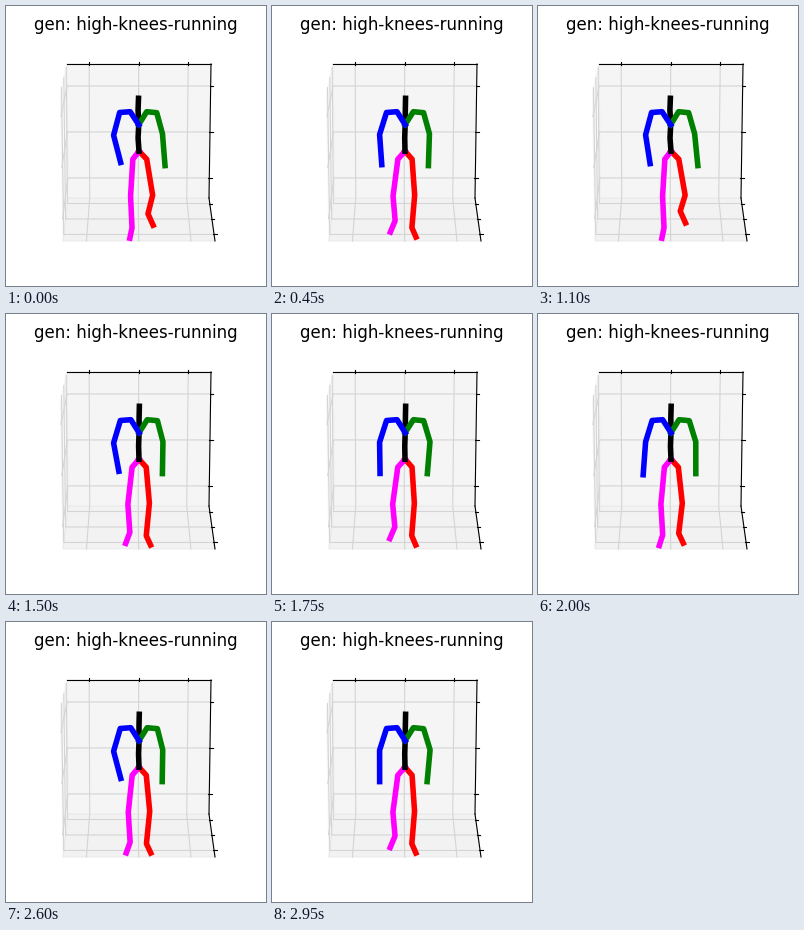
These frames come from a looping animation (260 by 280 pixels, 3000 ms). A matplotlib script:

```python
import numpy as np
import matplotlib.pyplot as plt
from matplotlib.animation import FuncAnimation
from matplotlib.patches import Polygon

W, H, DPI = 260, 280, 100
FRAMES, STEP = 60, 50
STRIDE = 1150  # ms for one full running cycle

fig = plt.figure(figsize=(W / DPI, H / DPI), dpi=DPI, facecolor="white")
ax = fig.add_axes([0, 0, 1, 1])
ax.set_xlim(0, W)
ax.set_ylim(H, 0)
ax.axis("off")
ax.text(129.5, 24.5, "gen: high-knees-running", fontsize=12,
        family="DejaVu Sans", ha="center", va="baseline")

# Corners of the box: back/front, top/bottom, left/right
BTL, BTR, BBL, BBR = map(np.array, ((61, 58), (205, 58), (62, 192), (203, 192)))
FTL, FBL, FBR = map(np.array, ((54.5, 86), (57, 235), (209, 235)))


def mix(a, b, k):
    return a + (b - a) * k


def path(points, color, width, z):
    x, y = zip(*points)
    return ax.plot(x, y, color=color, lw=width, zorder=z)[0]


def pane(points, shade):
    ax.add_patch(Polygon(points, facecolor=str(shade), edgecolor=str(shade),
                         alpha=0.5, lw=1, zorder=0))


def grid(*points):
    path(points, "#d4d4d4", 0.8, 1)


def axis_line(*points):
    path(points, "black", 0.8, 2)


def draw_box():
    pane([BTL, FTL, FBL, BBL], 0.95)
    pane([BBL, BBR, FBR, FBL], 0.90)
    pane([BTL, BTR, BBR, BBL], 0.925)

    for i in range(3):
        k = 0.154 + 0.344 * i
        top = mix(BTL, BTR, k)
        grid(top, mix(BBL, BBR, k), mix(FBL, FBR, k))
        axis_line(top - (0, 2.5), top + (0, 1))

        k = 0.164 + 0.343 * i
        edge = mix(BTR, BBR, k)
        grid(edge, mix(BTL, BBL, k), mix(FTL, FBL, k))
        axis_line(edge - (1, 0), edge + (2.7, 0))

        k = 0.128 + 0.36 * i
        edge = mix(BBR, FBR, k)
        grid(edge, mix(BBL, FBL, k), mix(BTL, FTL, k))
        axis_line(edge - (1, 0), edge + (2.5, 0))

    for a, b in ((BTL, BTR), (BTR, BBR), (BBR, FBR)):
        axis_line(a, b)


def wave(phase, peak, harmonic=1):
    return np.cos(2 * np.pi * harmonic * (phase - peak))


def lift(phase, peak, half):
    """Smooth bump, 1 at the peak and 0 beyond half a width from it."""
    d = abs((phase - peak + 0.5) % 1 - 0.5)
    return np.cos(min(1, d / half) * np.pi / 2) ** 2


def pose(t):
    p = t / STRIDE
    r = 17 * lift(p, -0.07, 0.25)  # right foot height
    m = 9 * lift(p, 0.487, 0.31)   # left foot height
    u = r - m                      # weight shift
    v = min(u, 9)

    root, chest = (133, 145.2), (133 - 0.02 * u, 118.7)
    swing = 6 * wave(p, 0.16) + 2 * wave(p, 0.1, 2)
    flare = 2 * wave(p, 0.92) + 1.2 * wave(p, 0.38, 2)

    return {
        "red": [root, (140.3 + 0.03 * u, 153.2), (144 + 0.19 * u, 189.2),
                (140.6 + 0.1 * u, 221.7 - r), (145 + 0.15 * u, 231 - 0.85 * r)],
        "magenta": [root, (126.3 + 0.06 * v, 153.2), (122.6 + 0.22 * v, 190.2),
                    (124.4 + 0.18 * v, 221.7 - m), (120.8 + 0.34 * v, 232.2 - 0.87 * m)],
        "black": [root, (132.5 - 0.03 * u, 132), chest,
                  (132.9 - 0.06 * u, 104), (133.2 - 0.05 * u, 92.3)],
        "green": [chest, (141.1 - 0.03 * u, 105.7), (151.3 - 0.04 * u, 106.7),
                  (157.2 - 0.9 * wave(p, 0.1), 127.8), (157.2 + flare, 159.6)],
        "blue": [chest, (124.7 - 0.04 * u, 105.7), (114.2 - 0.04 * u, 106.5),
                 (107.6, 128.7 + 0.15 * swing), (110.8 + swing, 158.2 - 0.45 * swing)],
    }


draw_box()
limbs = {color: path(points, color, 4, 3) for color, points in pose(0).items()}


def update(i):
    for color, points in pose(i * STEP).items():
        limbs[color].set_data(*zip(*points))
    return list(limbs.values())


anim = FuncAnimation(fig, update, frames=FRAMES, interval=STEP,
                     init_func=lambda: update(0), repeat=True, repeat_delay=0)
plt.show()
```
